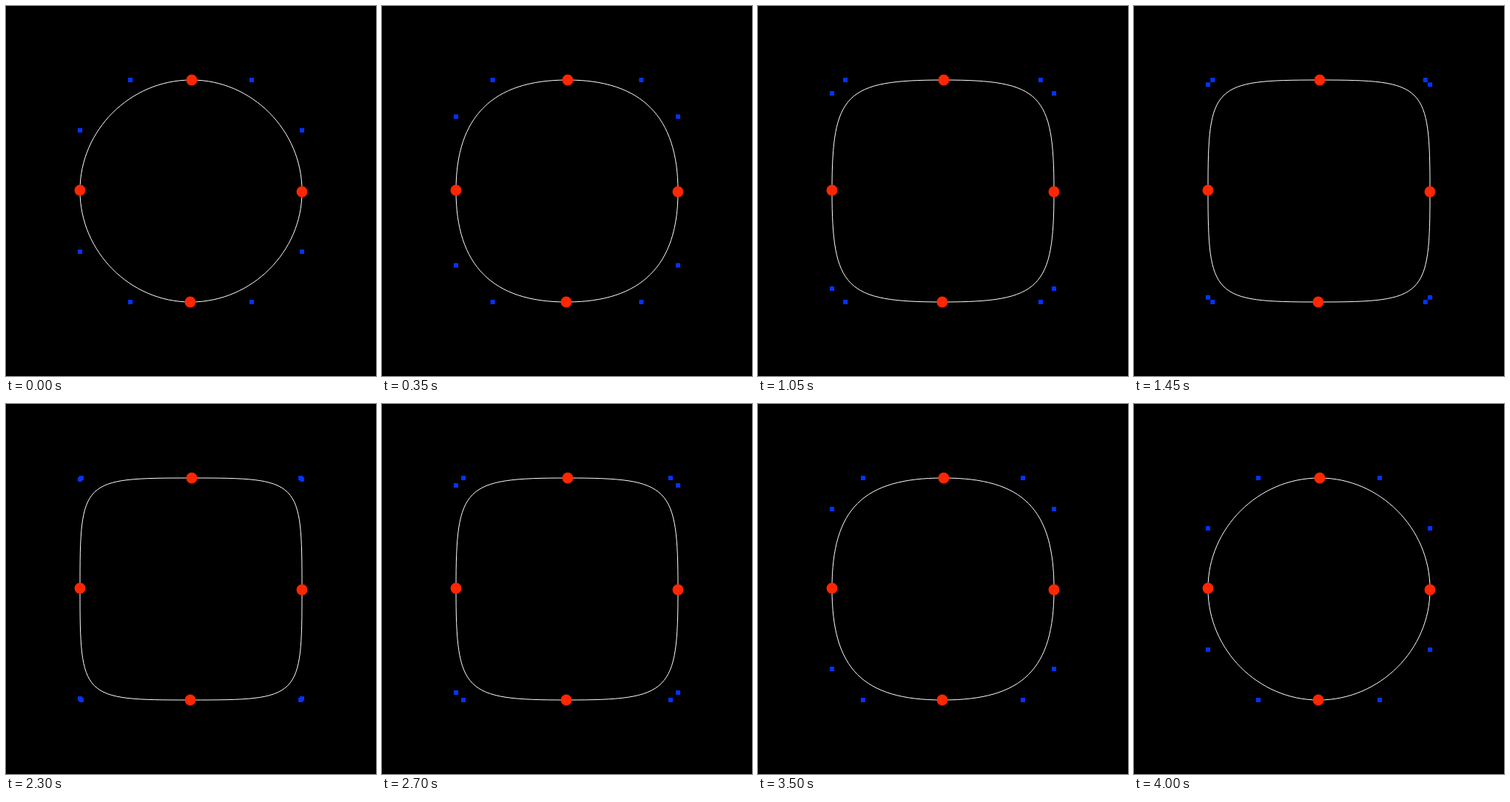
Recreate the animation shown at these times as an HTML page with a canvas. Size 500 by 500 pixels, loop 4.05 s.

```html
<!DOCTYPE html>
<html lang="en">
<head>
<meta charset="utf-8">
<title>Circle to squircle</title>
<style>
  html, body { margin: 0; width: 100%; height: 100%; overflow: hidden; background: #000; }
  canvas { display: block; }
</style>
</head>
<body>
<canvas id="stage" width="500" height="500"></canvas>
<script>
const ctx = document.getElementById('stage').getContext('2d');
const LOOP = 4050, STEP = 50, SWING = 80;
const CENTER = 250, R = 150, HANDLE = 82, GAP = 1;

function draw(time) {
  const step = Math.floor((time % LOOP) / STEP);
  const handle = HANDLE + (R - HANDLE) * Math.sin(Math.PI * step / SWING);

  ctx.setTransform(1, 0, 0, 1, 0, 0);
  ctx.fillStyle = '#000';
  ctx.fillRect(0, 0, 500, 500);
  ctx.translate(CENTER, CENTER);

  eachQuarter(() => {
    ctx.strokeStyle = '#fff';
    ctx.lineWidth = 1;
    ctx.beginPath();
    ctx.moveTo(GAP, -R);
    ctx.bezierCurveTo(handle, -R, R, -handle, R, 0);
    ctx.stroke();
  });

  eachQuarter(() => {
    ctx.fillStyle = '#0433ff';
    square(handle, -R);
    square(R, -handle);
    ctx.fillStyle = '#ff2600';
    ctx.beginPath();
    ctx.arc(GAP, -R, 7.5, 0, Math.PI * 2);
    ctx.fill();
  });
}

// Four exact right-angle turns, ending back at the start
function eachQuarter(paint) {
  for (let i = 0; i < 4; i++) {
    paint();
    ctx.transform(0, 1, -1, 0, 0, 0);
  }
}

function square(x, y) {
  ctx.fillRect(x - 3, y - 3, 6, 6);
}

const start = performance.now();
function tick() {
  draw(performance.now() - start);
  requestAnimationFrame(tick);
}
tick();
</script>
</body>
</html>
```
